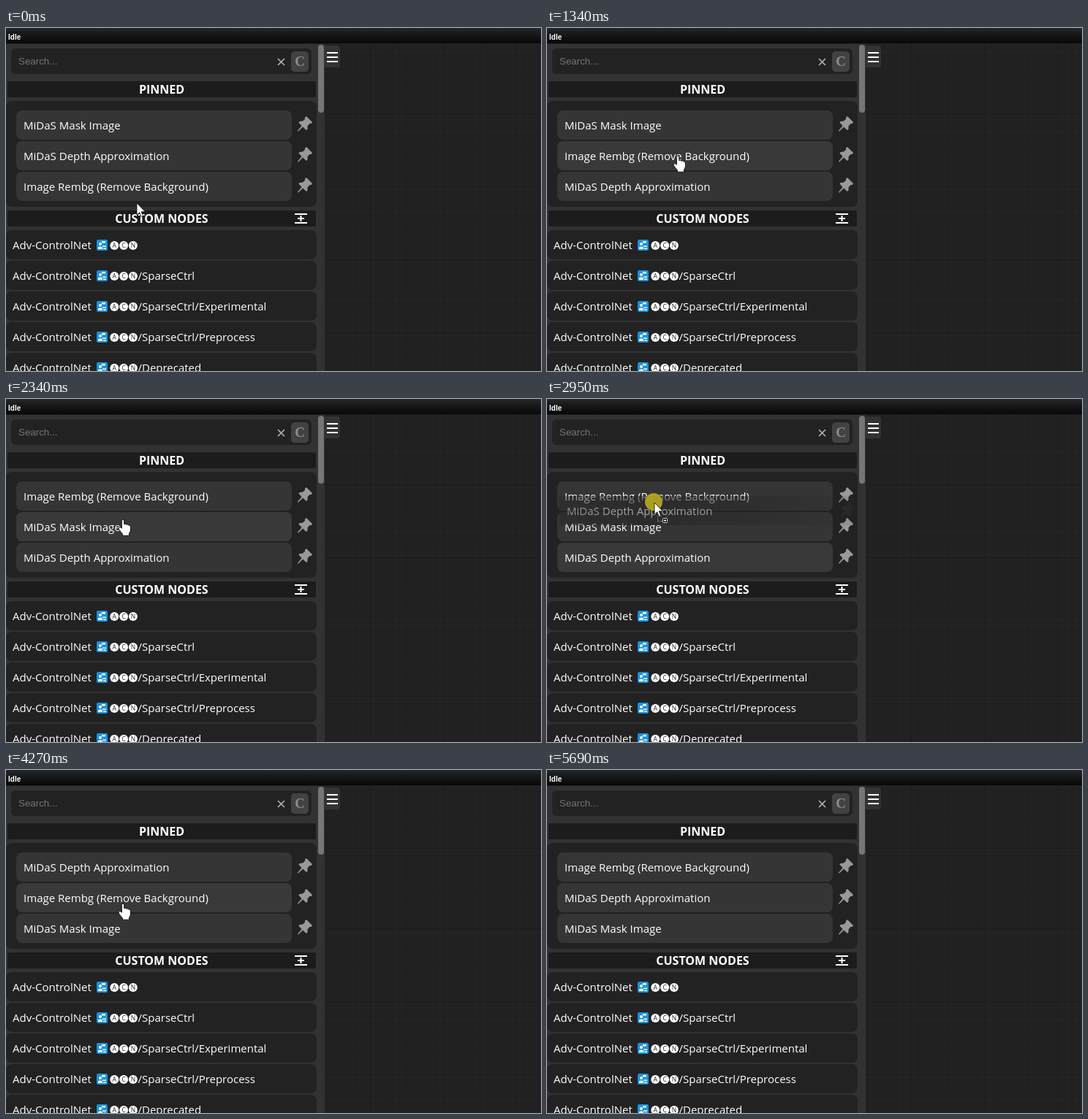
An HTML page that plays this animation: 732 px wide and 470 px high, repeating every 6750 ms.

```html
<!DOCTYPE html>
<html lang="en">
<head>
<meta charset="utf-8">
<title>Pinned nodes</title>
<style>
html, body { margin: 0; width: 100%; height: 100%; overflow: hidden; background: #212121; }
svg { display: block; width: 732px; height: 470px; }
text { font: 15px "Open Sans", "Noto Sans", sans-serif; fill: #fff; white-space: pre; }
.head { font-weight: 700; font-size: 16px; text-anchor: middle; }
.idle { font: bold 10px "Liberation Sans", Arial, sans-serif; }
.hint { font: 13.333px "Liberation Sans", Arial, sans-serif; fill: #757575; }
.key { font: bold 19px "Liberation Serif", serif; fill: #8c8c8c; text-anchor: middle; }
.ring { font-size: 8.5px; fill: #222; text-anchor: middle; }
</style>
</head>
<body>
<svg id="stage" viewBox="0 0 732 470">
  <defs>
    <linearGradient id="bar" x2="0" y2="1">
      <stop offset="0" stop-color="#1f272c"/><stop offset=".2" stop-color="#1c2125"/>
      <stop offset=".3" stop-color="#1b1b1b"/><stop offset="1" stop-color="#080808"/>
    </linearGradient>
    <pattern id="grid" x="498" y="17" width="100" height="100" patternUnits="userSpaceOnUse">
      <path id="cells" stroke="#1f1f1f"/>
      <path d="M.5 0V100M0 .5H100" stroke="#1b1b1b"/>
    </pattern>
    <radialGradient id="fade" gradientUnits="userSpaceOnUse" r="290">
      <stop offset="0" stop-color="#fff" stop-opacity=".62"/>
      <stop offset=".45" stop-color="#fff" stop-opacity=".42"/>
      <stop offset="1" stop-color="#fff" stop-opacity="0"/>
    </radialGradient>
    <mask id="veil" maskUnits="userSpaceOnUse" x="0" y="0" width="732" height="470">
      <rect width="732" height="470" fill="url(#fade)"/>
    </mask>
    <path id="pin" fill="#999" d="M409 122.5 411 121 419 129 417.8 131 415.5 131 412.6 134.2 412.5 138.6 410.8 140 406.2 135.6 400 141.6 398.8 141 404.6 134 400.4 129.6 401.6 128 406 127.6 409 124.8Z"/>
    <g id="tag">
      <rect x="124" y="-7" width="15" height="15" rx="2" fill="#1793dc"/>
      <path d="M126 6V3.5q3-2 6 0V6ZM132 1.5h5v1.5h-5ZM133 4.5h4V6h-4ZM131-5h5v2.5h-5Z" fill="#fff"/>
      <circle cx="129" cy="-1" r="2" fill="#fff"/>
    </g>
  </defs>

  <rect width="732" height="470" fill="#222"/>
  <rect x="436" y="21" width="296" height="449" fill="url(#grid)"/>
  <rect width="732" height="21" fill="url(#bar)"/>
  <text class="idle" x="3" y="16">Idle</text>
  <rect y="22" width="436" height="448" fill="#323232"/>
  <rect x="427" y="23" width="8" height="93" rx="4" fill="#767676"/>
  <path d="M436 24h17a4 4 0 0 1 4 4v22a4 4 0 0 1-4 4h-17Z" fill="#333"/>
  <path d="M439 34h15M439 40h15M439 46h15" stroke="#fff" stroke-width="2"/>

  <rect x="7" y="28" width="411" height="35" rx="6" fill="#222"/>
  <text class="hint" x="17" y="50">Search...</text>
  <path d="M372 42l9 9m0-9l-9 9" stroke="#b5b5b5" stroke-width="1.6"/>
  <rect x="390" y="32" width="24" height="28" rx="5" fill="#424242"/>
  <text class="key" x="402" y="52">C</text>

  <rect x="2" y="73" width="422" height="22" rx="2" fill="#1c1c1c"/>
  <text class="head" x="213" y="90">PINNED</text>
  <rect y="100" width="425" height="145" rx="8" fill="#222"/>
  <g id="pins"></g>
  <rect x="2" y="250" width="422" height="22" rx="2" fill="#1c1c1c"/>
  <text class="head" x="213" y="267">CUSTOM NODES</text>
  <path d="M395 255h17M395 267h17M399 261h9M403.5 257v8" stroke="#fff" stroke-width="2"/>
  <g id="nodes"></g>

  <g id="ghost"><g mask="url(#veil)">
    <rect id="plate" x="14" width="411" height="40" fill="#262626"/>
    <text id="label" x="24"></text>
    <use id="ghostPin" href="#pin"/>
  </g></g>
  <g id="mouse">
    <circle id="disc" cx="-1" cy="-1" r="12" fill="#b0a41f" opacity=".95"/>
    <path id="arrow" d="M0 0V16.2L3.7 12.8 6.2 18.6 8.6 17.5 6.1 11.8H11.4Z" fill="#fff" stroke="#111" stroke-width=".8"/>
    <g id="copy" fill="none">
      <path d="M4.5 18.5h6m7 0v2m-13 0v5h6" stroke="#aaa" stroke-dasharray="1 1"/>
      <rect x="11.5" y="21.5" width="6" height="6" rx="1" fill="#111" stroke="#ddd"/>
      <path d="M13 24.5h3M14.5 23v3" stroke="#fff"/>
    </g>
    <path id="hand" d="M-1.7 1.2Q0-1 1.7 1.2V6.5Q3.4 5.4 4.9 7.2 6.8 6.2 8 8.1 10.4 7.4 10.4 10V15Q10.2 17 8.5 19.2V22.2H-.6V20Q-3 17.4-5.7 13.4-6.4 11-4.2 10.6-2.6 10.8-1.7 12.2Z" fill="#fff" stroke="#111"/>
  </g>
</svg>
<script>
const $ = id => document.getElementById(id);
const LOOP = 6750, TICK = 66.8;
const rowY = i => 113 + 42 * i;
const MASK = 'MiDaS Mask Image';
const DEPTH = 'MiDaS Depth Approximation';
const REMBG = 'Image Rembg (Remove Background)';

// [tick, order of the pinned rows from then on]
const orders = [
  [0, [MASK, DEPTH, REMBG]],
  [14, [MASK, REMBG, DEPTH]],
  [31, [REMBG, MASK, DEPTH]],
  [55, [DEPTH, REMBG, MASK]],
  [74, [REMBG, DEPTH, MASK]]
];
// [press tick, drop tick, dragged row]
const drags = [[5, 14, 2], [23, 31, 1], [40, 55, 2], [65, 74, 1]];
// pointer path: [tick, x, y]
const path = [
  [0, 179, 240], [4, 182, 217], [5, 182, 216], [10, 178, 173],
  [19, 178, 173], [20, 179, 175], [21, 177, 176], [23, 176, 175], [27, 176, 132],
  [31, 176, 132], [35, 160, 165], [39, 145, 205], [40, 144, 206],
  [44, 147, 142], [47, 154, 122], [49, 154, 122], [52, 156, 134], [55, 156, 134],
  [60, 161, 219], [64, 160, 183], [65, 160, 181], [70, 160, 131],
  [78, 160, 131], [84, 670, 394], [85, 670, 394]
];

let cells = '';
for (let i = 10; i < 100; i += 10) cells += `M${i}.5 0V100M0 ${i}.5H100`;
$('cells').setAttribute('d', cells);

$('pins').innerHTML = [0, 1, 2].map(i => `
  <rect x="14" y="${rowY(i)}" width="377" height="40" rx="8"/>
  <text x="24" y="${rowY(i) + 26}"></text>
  <use href="#pin" y="${42 * i}"/>`).join('');
const rects = $('pins').querySelectorAll('rect');
const labels = $('pins').querySelectorAll('text');

$('nodes').innerHTML = ['', '/SparseCtrl', '/SparseCtrl/Experimental', '/SparseCtrl/Preprocess', '/Deprecated']
  .map((name, i) => {
    const y = 277 + 42 * i;
    const rings = [...'ACN'].map((c, k) => `
      <circle cx="${148.3 + 12.8 * k}" cy="${y + 21}" r="6" fill="#fff"/>
      <text class="ring" x="${148.3 + 12.8 * k}" y="${y + 24}">${c}</text>`).join('');
    return `<rect y="${y}" width="425" height="40" rx="8" fill="#222"/>
      <text x="9" y="${y + 26}">Adv-ControlNet</text>
      <use href="#tag" y="${y + 20}"/>${rings}
      <text x="180.5" y="${y + 26}">${name}</text>`;
  }).join('');

function pointAt(tick) {
  const n = path.findIndex(p => p[0] > tick);
  if (n < 0) return path[path.length - 1].slice(1);
  const [t0, x0, y0] = path[n - 1], [t1, x1, y1] = path[n];
  const k = (tick - t0) / (t1 - t0);
  return [Math.round(x0 + (x1 - x0) * k), Math.round(y0 + (y1 - y0) * k)];
}

const show = (id, on) => { $(id).style.display = on ? '' : 'none'; };
const set = (id, attrs) => { for (const k in attrs) $(id).setAttribute(k, attrs[k]); };

function draw(time) {
  const tick = Math.floor((time + 20) / TICK);
  const order = orders.filter(o => o[0] <= tick).pop()[1];
  const drag = drags.find(d => tick >= d[0] && tick < d[1]);
  const moving = !!drag && tick > drag[0];
  const [x, y] = pointAt(tick);
  const onScreen = tick < 85;
  const overPins = onScreen && x > 14 && x < 391 && y >= 113 && y < 237;
  const hot = drag ? drag[2] : overPins ? Math.floor((y - 112) / 42) : -1;

  order.forEach((name, i) => {
    labels[i].textContent = name;
    rects[i].setAttribute('fill', i === hot ? '#393939' : '#353535');
  });

  show('ghost', moving);
  if (moving) {
    const [px, py] = pointAt(drag[0]), row = drag[2];
    set('ghost', { transform: `translate(${x - px} ${y - py})` });
    set('fade', { cx: px, cy: py });
    set('plate', { y: rowY(row) });
    set('label', { y: rowY(row) + 26 });
    set('ghostPin', { y: 42 * row });
    $('label').textContent = order[row];
  }

  show('mouse', onScreen);
  set('mouse', { transform: `translate(${x} ${y})` });
  show('disc', drag);
  show('copy', moving);
  show('hand', overPins && !moving);
  show('arrow', !overPins || moving);
}

const start = performance.now();
function loop() {
  draw((performance.now() - start) % LOOP);
  requestAnimationFrame(loop);
}
loop();
</script>
</body>
</html>
```
